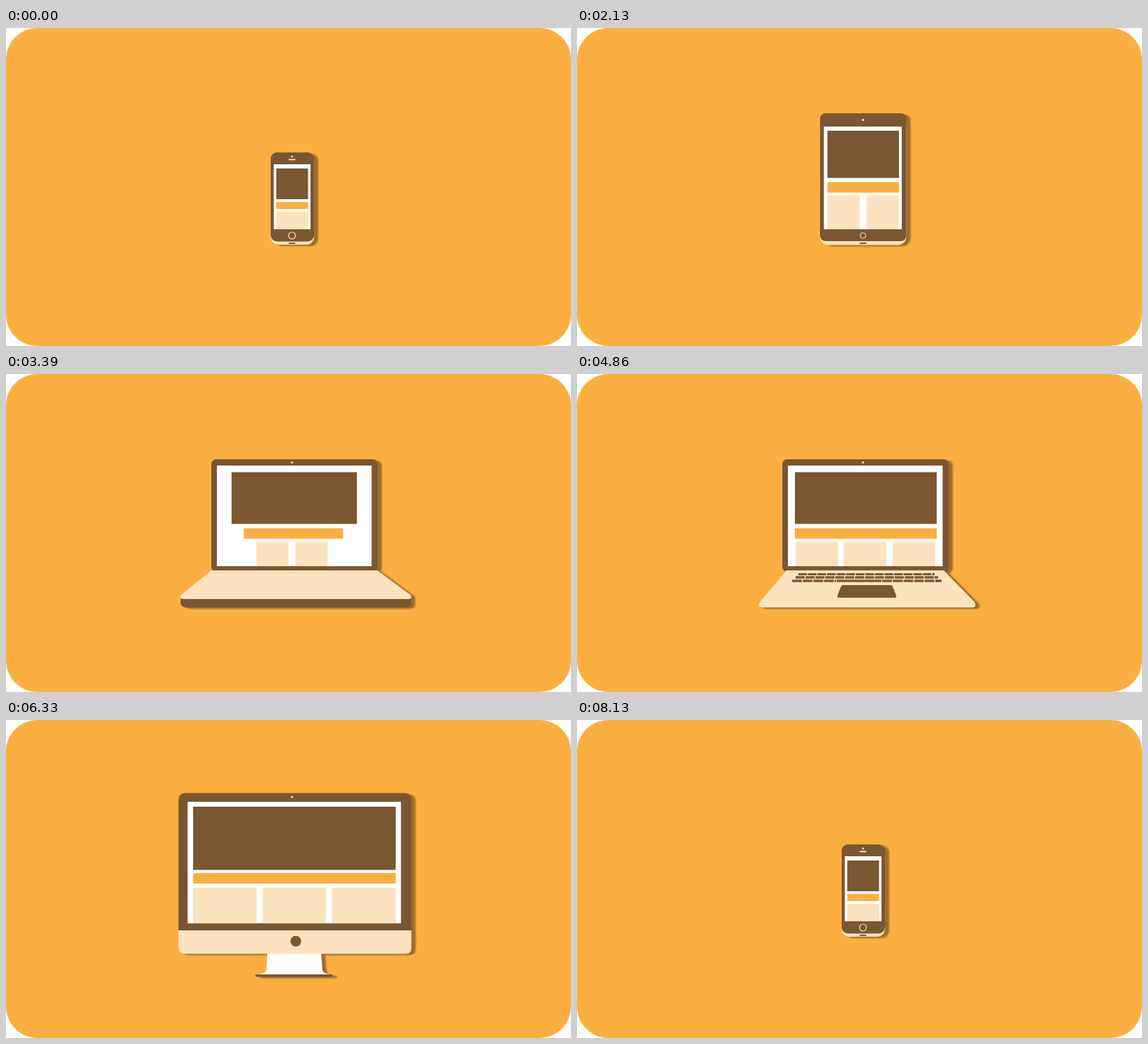
An HTML page that plays this animation: 809x455 px, repeating every 8190 ms.

```html
<!DOCTYPE html>
<html lang="en">
<head>
<meta charset="utf-8">
<title>Responsive layout</title>
<style>
:root { --amber: #fbaf41; --brown: #7a5732; --cream: #fde2bf; }
html, body { margin: 0; width: 100%; height: 100%; overflow: hidden; background: #fff; }
svg { display: block; width: 809px; height: 455px; }
.brown { fill: var(--brown); }
.cream { fill: var(--cream); }
.amber { fill: var(--amber); }
.white { fill: #fff; }
.shaded { filter: drop-shadow(6px 2px .8px rgba(95, 65, 30, .6)); }
.shaded > *, .page > * { animation: 8190ms ease-in-out infinite; }

/* Device shells */
#back { animation-name: back; }
@keyframes back {
  0%, 8.79%, 99.27%, 100% { x: 379px; y: 186px; width: 62px; height: 124px; rx: 11px; }
  16.85%, 26.01% { x: 348px; y: 130px; width: 123.5px; height: 180.5px; rx: 12px; }
  35.9%, 90.11% { x: 304px; y: 130px; width: 220px; height: 150px; rx: 7px; }
  97.07% { x: 379px; y: 186px; width: 62px; height: 124px; rx: 11px; }
}
#body { animation-name: body; }
@keyframes body {
  0%, 8.79%, 99.27%, 100% { x: 379px; y: 178px; width: 62px; height: 127.5px; rx: 9px; }
  16.85%, 26.01% { x: 348px; y: 122px; width: 123.5px; height: 183px; rx: 8px; }
  35.9% { x: 303px; y: 122px; width: 222px; height: 161px; rx: 7px; }
  41.39%, 59.34% { x: 294px; y: 122px; width: 238px; height: 161px; rx: 7px; }
  65.57% { x: 249px; y: 104.5px; width: 331px; height: 229px; rx: 9px; }
  68.86%, 90.11% { x: 247px; y: 104.5px; width: 333.5px; height: 229px; rx: 9px; }
  97.07% { x: 379px; y: 170px; width: 62px; height: 135.5px; rx: 9px; }
}
#front { animation-name: front; }
@keyframes front {
  0%, 36.26%, 87.19%, 100% { x: 400px; y: 281px; width: 20px; height: 0; }
  41.39% { x: 250px; y: 314px; width: 330px; height: 20px; }
  46.15%, 87.18% { x: 270px; y: 322px; width: 292px; height: 11px; }
}
#deck { animation-name: deck; }
@keyframes deck {
  0%, 36.26% { d: path("M303 281L525 281L525 281Q525 281 525 281L303 281Q303 281 303 281Z"); }
  41.39% { d: path("M294 281L532 281L579 316Q583 322 576 322L254 322Q247 322 251 316Z"); }
  46.15%, 59.34% { d: path("M300 281L525 281L569 326Q573 334 566 334L265 334Q258 334 262 326Z"); }
  65.57% { d: path("M249 301L580 301L580 326Q580 334 572 334L257 334Q249 334 249 326Z"); }
  68.86%, 90.11% { d: path("M247 301L580.5 301L580.5 326Q580.5 334.5 572 334.5L256 334.5Q247 334.5 247 326Z"); }
  97.07% { d: path("M379 305L441 305L441 305Q441 310 432 310L388 310Q379 310 379 305Z"); }
  98%, 100% { d: path("M388 309L432 309L432 309Q432 309 432 309L388 309Q388 309 388 309Z"); }
}
#stand { animation-name: stand; }
@keyframes stand {
  0%, 65.92% { transform: translateY(-30px); opacity: 0; }
  65.93% { transform: translateY(-30px); opacity: 1; }
  68.86% { transform: none; opacity: 1; }
  75.82%, 87.18% { transform: translateY(10px); opacity: 1; }
  89.8% { transform: translateY(-30px); opacity: 1; }
  89.81%, 100% { transform: translateY(-30px); opacity: 0; }
}

/* Device details */
#camera { animation-name: camera; }
@keyframes camera {
  0%, 8.79%, 99.27%, 100% { cy: 184px; r: 1.4px; }
  16.85%, 26.01% { cy: 131.5px; r: 1.7px; }
  35.9%, 68.86% { cy: 126.5px; r: 1.6px; }
  75.82%, 90.11% { cy: 110px; r: 1.5px; }
  97.07% { cy: 176px; r: 1.4px; }
}
#speaker { animation-name: speaker; }
@keyframes speaker {
  0%, 8.79%, 99.27%, 100% { x: 404.5px; y: 187.3px; width: 10px; height: 2px; }
  11%, 96% { x: 409.5px; y: 180px; width: 0; height: 2px; }
  97.07% { x: 404.5px; y: 179.3px; width: 10px; height: 2px; }
}
#home { animation-name: home; }
@keyframes home {
  0%, 8.79%, 97.07%, 100% { r: 5px; stroke-width: 1.2px; }
  16.85%, 26.01% { r: 4px; stroke-width: 1px; }
  29%, 94.5% { r: 0; stroke-width: 0; }
}
#port { animation-name: port; }
@keyframes port {
  0%, 26.01%, 98%, 100% { x: 404.5px; width: 10px; }
  28%, 97% { x: 409.5px; width: 0; }
}
#keys { animation-name: keys; }
@keyframes keys {
  0%, 41.8% { opacity: 0; }
  46.15%, 59.34% { opacity: 1; }
  62%, 100% { opacity: 0; }
}
#knob { animation-name: knob; }
@keyframes knob {
  0%, 61% { r: 0; }
  65.57%, 90.4% { r: 7.7px; }
  94%, 100% { r: 0; }
}

/* Page layout */
#screen { animation-name: screen; }
@keyframes screen {
  0%, 8.79%, 97.07%, 100% { x: 383.5px; y: 195px; width: 52.5px; height: 93px; }
  16.85%, 26.01% { x: 353.5px; y: 141px; width: 111.5px; height: 147px; }
  35.9% { x: 311px; y: 131px; width: 205px; height: 144px; }
  41.39%, 65.93% { x: 302px; y: 131px; width: 221.5px; height: 144px; }
  68.86% { x: 262px; y: 131px; width: 301.5px; height: 144px; }
  75.82%, 90.11% { x: 260px; y: 117px; width: 305.5px; height: 174px; }
}
#hero { animation-name: hero; }
@keyframes hero {
  0%, 8.79%, 97.07%, 100% { x: 387px; y: 201px; width: 45.5px; height: 44px; }
  16.85%, 26.01% { x: 358.5px; y: 147px; width: 102.5px; height: 67.5px; }
  35.9% { x: 358.5px; y: 140.5px; width: 102.5px; height: 74px; }
  41.39% { x: 323px; y: 140.5px; width: 179.5px; height: 74px; }
  46.15%, 68.86% { x: 312px; y: 140.5px; width: 203px; height: 74px; }
  75.82%, 87.18% { x: 268px; y: 124px; width: 290px; height: 90.5px; }
  90.11% { x: 367px; y: 124px; width: 87px; height: 90.5px; }
  91.6% { x: 387px; y: 128px; width: 45.5px; height: 87px; }
}
#bar { animation-name: bar; }
@keyframes bar {
  0%, 8.79%, 97.07%, 100% { x: 387px; y: 249px; width: 45.5px; height: 10px; }
  16.85%, 26.01%, 35.9% { x: 358.5px; y: 220.7px; width: 102.5px; height: 15px; }
  41.39% { x: 340.5px; y: 220.7px; width: 142px; height: 15px; }
  46.15%, 68.86% { x: 312px; y: 220.7px; width: 203px; height: 15px; }
  75.82%, 87.18% { x: 268px; y: 219px; width: 290px; height: 15px; }
  90.11% { x: 387px; y: 219px; width: 45.5px; height: 15px; }
}
#left { animation-name: left; }
@keyframes left {
  0%, 10% { x: 358.5px; y: 240px; width: 46px; height: 0; }
  16.85%, 26.01% { x: 358.5px; y: 240px; width: 46px; height: 48px; }
  35.9%, 41.39% { x: 358.5px; y: 240px; width: 46px; height: 35px; }
  46.15%, 68.86% { x: 313px; y: 240px; width: 61px; height: 35px; }
  75.82% { x: 268px; y: 240px; width: 91px; height: 46px; }
  77.29%, 87.18% { x: 268px; y: 240px; width: 91px; height: 51px; }
  90.11% { x: 294px; y: 240px; width: 77px; height: 8px; }
  90.9%, 100% { x: 300px; y: 240px; width: 70px; height: 0; }
}
#middle { animation-name: middle; }
@keyframes middle {
  0%, 8.79%, 97.07%, 100% { x: 387px; y: 263px; width: 45.5px; height: 25px; }
  16.85%, 26.01% { x: 414.5px; y: 240px; width: 46px; height: 48px; }
  35.9%, 41.39% { x: 414.5px; y: 240px; width: 46px; height: 35px; }
  46.15%, 68.86% { x: 382px; y: 240px; width: 61px; height: 35px; }
  75.82% { x: 367.5px; y: 240px; width: 91px; height: 46px; }
  77.29%, 87.18% { x: 367.5px; y: 240px; width: 91px; height: 51px; }
  90.11% { x: 380px; y: 240px; width: 64px; height: 51px; }
  91.6% { x: 387px; y: 241px; width: 45.5px; height: 49px; }
}
#right { animation-name: right; }
@keyframes right {
  0%, 41.39% { x: 460px; y: 240px; width: 0; height: 35px; }
  46.15%, 68.86% { x: 452px; y: 240px; width: 61px; height: 35px; }
  75.82% { x: 467px; y: 240px; width: 91px; height: 46px; }
  77.29%, 87.18% { x: 467px; y: 240px; width: 91px; height: 51px; }
  90.11% { x: 456px; y: 240px; width: 75px; height: 8px; }
  90.9%, 100% { x: 455px; y: 240px; width: 70px; height: 0; }
}
</style>
</head>
<body>
<svg viewBox="0 0 809 455">
  <rect class="amber" width="809" height="455" rx="45"/>
  <g class="shaded">
    <g id="stand">
      <path class="white" d="M375 310L373 347Q372 353 361 354H464Q454 353 453 347L450 310Z"/>
      <rect class="brown" x="357" y="354" width="111" height="3.5" rx="1.7"/>
    </g>
    <rect id="back" class="cream"/>
    <rect id="front" class="brown" rx="7"/>
    <rect id="body" class="brown"/>
    <path id="deck" class="cream"/>
  </g>
  <g class="page">
    <circle id="camera" class="cream" cx="409.5"/>
    <rect id="speaker" class="cream" rx="1"/>
    <circle id="home" cx="409.5" cy="297" fill="none" stroke="#fde2bf"/>
    <rect id="port" class="brown" y="307" height="2" rx="1"/>
    <g id="keys" fill="none" stroke="#7a5732">
      <path d="M317 286.5H512" stroke-width="3" stroke-dasharray="12.5 1.2"/>
      <path d="M313 291H517" stroke-width="3.6" stroke-dasharray="13 1.2"/>
      <path d="M308 296H371M437 296H522" stroke-width="3.4" stroke-dasharray="14 1.2"/>
      <path d="M372 296H436" stroke-width="3.4"/>
      <path class="brown" stroke="none" d="M381 302H449Q451 302 452 304L457 317Q458 320 455 320H375Q372 320 373 317L378 304Q379 302 381 302Z"/>
    </g>
    <circle id="knob" class="brown" cx="415" cy="316.5"/>
    <rect id="screen" class="white"/>
    <rect id="hero" class="brown"/>
    <rect id="bar" class="amber"/>
    <rect id="left" class="cream"/>
    <rect id="middle" class="cream"/>
    <rect id="right" class="cream"/>
  </g>
</svg>
</body>
</html>
```
